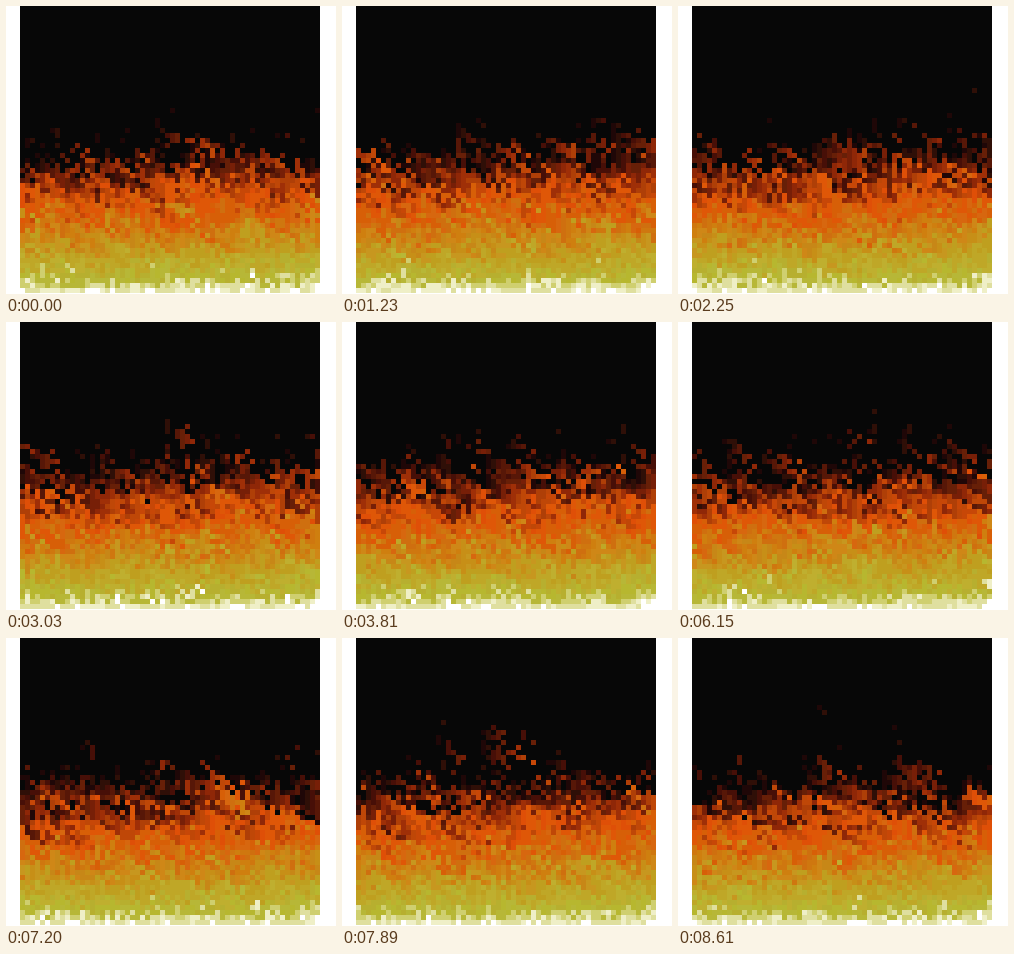
An HTML page with a canvas that plays this animation: 330x288 px, repeating every 8.67 s.

```html
<!DOCTYPE html>
<html lang="en">
<head>
<meta charset="utf-8">
<title>Pixel fire</title>
<style>
  html, body { margin: 0; width: 100%; height: 100%; overflow: hidden; background: #fff; }
  canvas { display: block; }
</style>
</head>
<body>
<canvas id="stage" width="330" height="288"></canvas>
<script>
const COLS = 60, ROWS = 60, CELL = 5;
const LEFT = 14, TOP = 287 - (ROWS - 1) * CELL;
const LOOP = 8670, TICK = 30, WARM_UP = 150;

// Ramp from black through red and orange to white heat.
const palette = `070707 1f0707 2f0f07 470f07 571707 671f07 771f07 8f2707 9f2f07
  af3f07 bf4707 c74707 df4f07 df5707 df5707 d75f07 d75f07 d7670f cf6f0f
  cf770f cf7f0f cf8717 c78717 c78f17 c7971f bf9f1f bf9f1f bfa727 bfa727
  bfaf2f b7af2f b7b72f b7b737 cfcf6f dfdf9f efefc7 ffffff`
  .split(/\s+/).map(hex => '#' + hex);
const HOTTEST = palette.length - 1;

// Runs of updates: first time, last time, number of updates.
const runs = [
  [60, 900, 20], [930, 1740, 18], [1800, 2640, 19], [2670, 3510, 20],
  [3540, 4350, 20], [4410, 5250, 21], [5280, 6120, 20], [6150, 6990, 21],
  [7050, 7890, 21], [7950, 8610, 17]
];

function seededRandom(seed) {
  return () => {
    seed = (seed + 0x6D2B79F5) | 0;
    let n = Math.imul(seed ^ (seed >>> 15), 1 | seed);
    n = (n + Math.imul(n ^ (n >>> 7), 61 | n)) ^ n;
    return ((n ^ (n >>> 14)) >>> 0) / 4294967296;
  };
}

// Heat rises one row, cools by 0 to 2 and drifts left by the same amount.
function spread(fire, random) {
  for (let x = 0; x < COLS; x++) {
    for (let y = 0; y < ROWS - 1; y++) {
      const cell = y * COLS + x;
      const decay = Math.floor(random() * 3);
      if (cell >= decay) fire[cell - decay] = Math.max(0, fire[cell + COLS] - decay);
    }
  }
}

function simulate(count) {
  const random = seededRandom(1993);
  const fire = new Uint8Array(COLS * ROWS);
  fire.fill(HOTTEST, COLS * (ROWS - 1));
  for (let i = 0; i < WARM_UP; i++) spread(fire, random);
  const states = [fire.slice()];
  while (states.length < count) {
    spread(fire, random);
    states.push(fire.slice());
  }
  return states;
}

function stepAt(time) {
  const now = Math.floor(time / TICK) * TICK;
  let step = 0;
  for (const [first, last, updates] of runs) {
    if (now < first) break;
    const progress = Math.min(1, (now - first) / (last - first));
    step += 1 + Math.floor(progress * (updates - 1) + 1e-6);
  }
  return step;
}

const states = simulate(1 + runs.reduce((sum, run) => sum + run[2], 0));
const ctx = document.getElementById('stage').getContext('2d');
let shown = -1;

function draw(time) {
  const step = stepAt(time);
  if (step === shown) return;
  shown = step;
  ctx.fillStyle = '#fff';
  ctx.fillRect(0, 0, 330, 288);
  ctx.fillStyle = palette[0];
  ctx.fillRect(LEFT, 0, COLS * CELL, 287);
  states[step].forEach((heat, i) => {
    if (!heat) return;
    ctx.fillStyle = palette[heat];
    ctx.fillRect(LEFT + (i % COLS) * CELL, TOP + Math.floor(i / COLS) * CELL, CELL, CELL);
  });
}

function animate() {
  draw(performance.now() % LOOP);
  requestAnimationFrame(animate);
}
animate();
</script>
</body>
</html>
```
